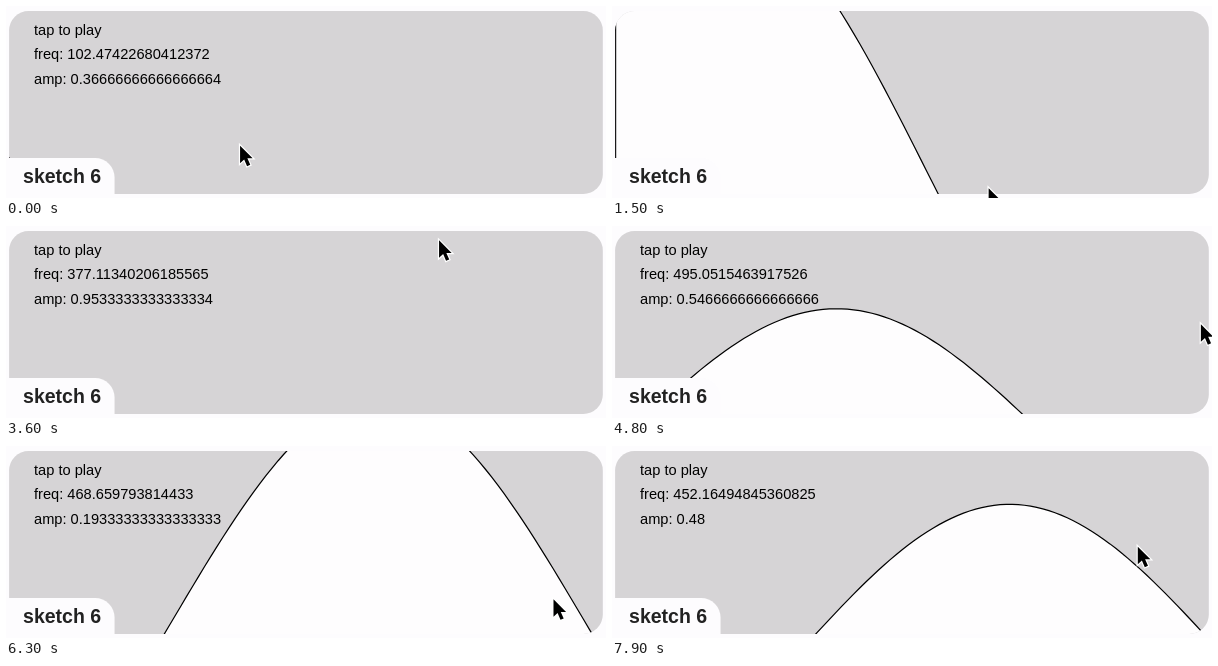
Write an HTML page that moves like this. It is 600x192 px and loops after 8000 ms.

```html
<!DOCTYPE html>
<html lang="en">
<head>
<meta charset="utf-8">
<title>sketch 6</title>
<style>
  html, body { margin: 0; height: 100%; overflow: hidden; background: #fdfcfe; }
  svg { display: block; width: 600px; height: 192px; }
  text { font-family: "Liberation Sans", Arial, sans-serif; font-size: 12px; }
  .label { font-size: 16px; font-weight: bold; fill: #222; }
</style>
</head>
<body>
<svg viewBox="0 0 600 192">
  <clipPath id="panel"><rect x="-.4" width="486.4" height="149.93" rx="16"/></clipPath>
  <g transform="translate(3.6 5) scale(1.2206)">
    <g clip-path="url(#panel)">
      <rect x="-1" width="488" height="150" fill="#d6d4d6"/>
      <text x="20" y="20">tap to play</text>
      <text x="20" y="39.6" id="freq"></text>
      <text x="20" y="59.8" id="amp"></text>
      <path id="wave" fill="#fefdfe" stroke="#000"/>
    </g>
    <path d="M-4 120.5H70a16 16 0 0 1 16 16V154H-4Z" fill="#fdfcfe"/>
    <text x="11" y="141" class="label">sketch 6</text>
  </g>
  <path id="cursor" d="M1 1.5V19L5.1 15.2 8 22 11.2 20.6 8.3 14.1H13.6Z" stroke="#fff" stroke-width="2.4" paint-order="stroke"/>
</svg>
<script>
const LOOP = 8000, STEP = 100, W = 485, H = 150;
const K = 0.0093, SPACING = 795;  // crest curvature, distance between crests
const LEAD = 80;                  // ms the drawn pointer runs ahead of the sketch
const $ = id => document.getElementById(id);

// turning points of the pointer: time, x, y
const pointer = [
  [0, 3, 95], [LEAD, 188, 110], [300, 215, 72], [500, 245, 56], [900, 262, 68],
  [1500, 300, 142], [1700, 312, 149], [2300, 348, 57], [2700, 328, 14],
  [3100, 300, 6], [3400, 300, 6], [4300, 464, 10], [4800, 479, 68],
  [5300, 477, 118], [6300, 447, 121], [7200, 422, 122], [7900, 427, 78]
];

// time, crest position, crests that have passed to the left
const crest = [
  [0, 650, 0], [1500, 84.7, 1], [2300, 135, 2], [4800, 181, 5],
  [6300, 302, 7], [7200, 322, 8], [7900, 323, 9]
].map(([t, x, n]) => [t, x - n * SPACING]);

function sample(keys, t) {
  let i = 0;
  while (i < keys.length - 2 && t >= keys[i + 1][0]) i++;
  const a = keys[i], b = keys[i + 1], p = Math.min(1, (t - a[0]) / (b[0] - a[0]));
  return a.slice(1).map((v, j) => v + (b[j + 1] - v) * p);
}

function wavePath(center, my) {
  let d = "M0 600";
  for (let x = 0; x <= W; x += 5) {
    const turns = (x - center) / SPACING;
    const dist = Math.abs(turns - Math.round(turns)) * SPACING;
    const lift = 0.25 + 0.75 * Math.cos(Math.min(Math.PI, K * dist));
    d += `L${x} ${(199.7 - 2 * my * lift).toFixed(2)}`;
  }
  return d + "V600Z";
}

function draw(now) {
  const t = Math.floor(now % LOOP / STEP) * STEP;
  const [mx, my] = sample(pointer, t).map(Math.round);
  const [x, y] = sample(pointer, t + LEAD);
  $("freq").textContent = "freq: " + (mx / W * 400 + 100);
  $("amp").textContent = "amp: " + (H - my) / H;
  $("wave").setAttribute("d", wavePath(sample(crest, t)[0], my));
  $("cursor").setAttribute("transform", `translate(${3.6 + 1.2206 * x} ${4 + 1.2206 * y})`);
}

const start = performance.now();
function tick() {
  draw(performance.now() - start);
  requestAnimationFrame(tick);
}
tick();
</script>
</body>
</html>
```
